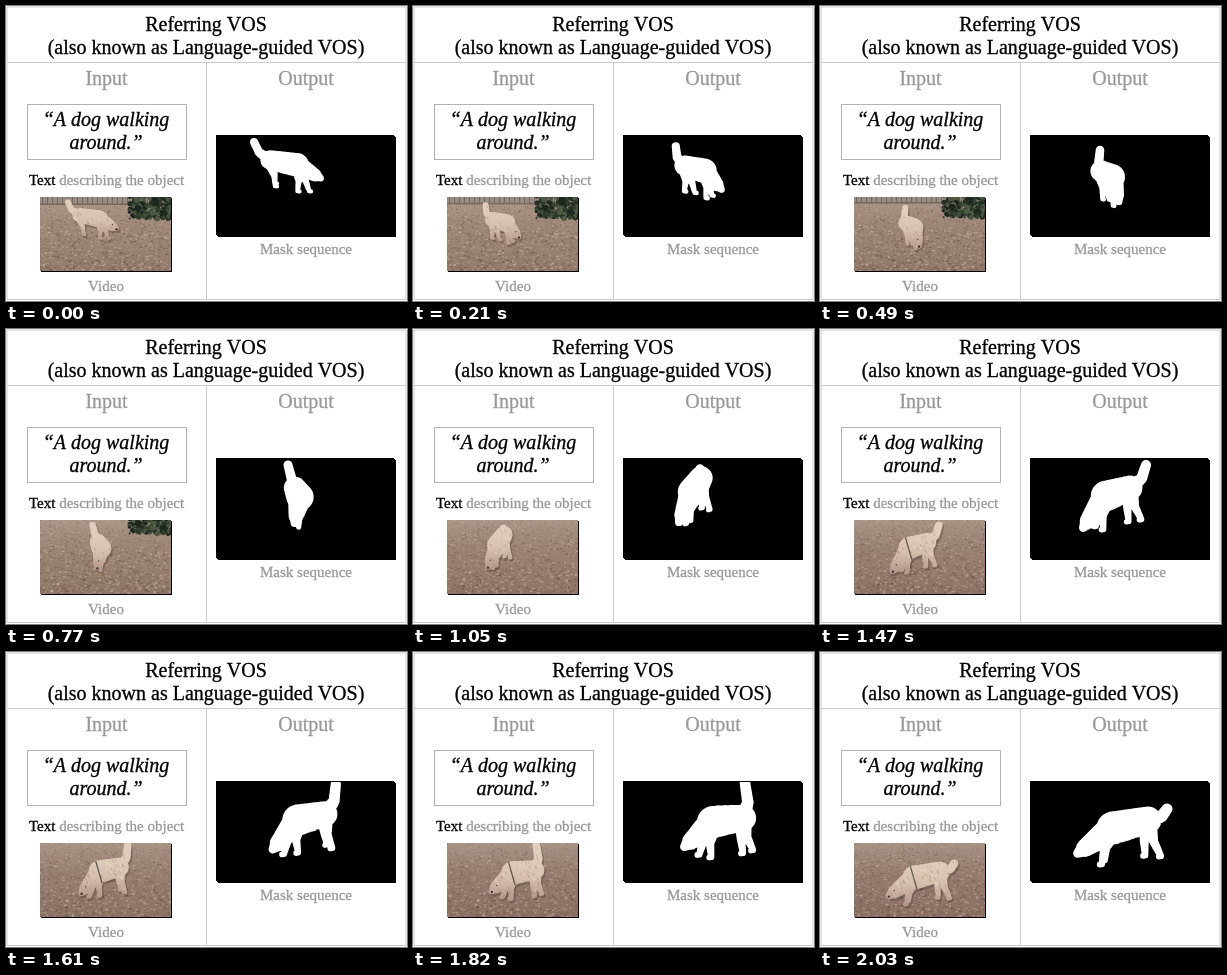
Recreate the animation shown at these times as an HTML page with a canvas. Size 401 by 295 pixels, loop 2100 ms.

```html
<!DOCTYPE html>
<html lang="en">
<head>
<meta charset="utf-8">
<style>
html, body { margin: 0; width: 401px; height: 295px; overflow: hidden; background: #fff; }
canvas { display: block; }
</style>
</head>
<body>
<canvas id="stage" width="401" height="295"></canvas>
<script>
const ctx = document.getElementById('stage').getContext('2d');
const STEP = 70, STEPS = 30;
const photo = { x: 34, y: 191, w: 131, h: 74 };
const mask = { x: 210, y: 129, w: 179, h: 101 };
const zoom = photo.w / mask.w;

// Key joints in mask coordinates: step, tail tip, rump, shoulder, head.
const poses = [
  [0, 248, 136, 264, 154, 291, 159, 309, 169],
  [7, 280, 144, 281, 165, 292, 171, 297, 189],
  [11, 282, 136, 289, 159, 294, 168, 290, 187],
  [15, 287, 140, 288, 149, 279, 163, 269, 186],
  [21, 326, 136, 310, 159, 286, 167, 268, 192],
  [26, 332, 131, 330, 166, 300, 170, 278, 189],
  [29, 347, 157, 328, 168, 293, 176, 265, 196]
];

let seed = 41;
function rnd() {
  seed = (seed * 16807) % 2147483647;
  return seed / 2147483647;
}
const pick = list => list[Math.floor(rnd() * list.length)];
const many = (n, make) => Array.from({ length: n }, make);
const leaves = many(1300, () => ({
  x: rnd() * 140, y: rnd() * 80, w: 0.7 + rnd() * 2, h: 0.6 + rnd(),
  color: pick(['#5d463b', '#77594b', '#c9b19f', '#d8c3b3'])
}));
const bush = many(260, () => ({
  x: 167 - 44 * rnd() ** 1.3, y: 189 + rnd() * 24, r: 0.8 + rnd() * 1.9,
  color: pick(['#252f25', '#34402f', '#1d261e', '#4d5843'])
}));
const tufts = many(220, () => ({ x: rnd() * 120, y: rnd() * 100, light: rnd() < 0.5 }));

const mix = (a, b, k) => a + (b - a) * k;
const clamp = (v, a, b) => Math.min(b, Math.max(a, v));
const ease = k => { k = clamp(k, 0, 1); return k * k * (3 - 2 * k); };

// Smooth curve through the key joints.
function joints(step) {
  const last = poses.length - 1;
  let i = 0;
  while (i < last - 1 && step >= poses[i + 1][0]) i++;
  const a = poses[i], b = poses[i + 1], span = b[0] - a[0];
  const u = (step - a[0]) / span;
  const slope = (j, c) => {
    const p = poses[Math.max(0, j - 1)], q = poses[Math.min(last, j + 1)];
    return (q[c] - p[c]) / (q[0] - p[0]) * span;
  };
  const value = c => mix(a[c], b[c], ease(u)) +
    u * (1 - u) * ((1 - u) * slope(i, c) - u * slope(i + 1, c));
  const point = c => ({ x: value(c), y: value(c + 1) });
  return { tail: point(1), rump: point(3), chest: point(5), head: point(7) };
}

// A tapered limb, built from overlapping circles.
function limb(path, a, ra, b, rb) {
  const n = Math.ceil(Math.hypot(b.x - a.x, b.y - a.y)) + 1;
  for (let i = 0; i <= n; i++) {
    const k = i / n, x = mix(a.x, b.x, k), y = mix(a.y, b.y, k), r = mix(ra, rb, k);
    path.moveTo(x + r, y);
    path.arc(x, y, r, 0, Math.PI * 2);
  }
}

function leg(path, hip, lead, size, turn, phase) {
  const swing = Math.sin(phase) * 8 * size * turn;
  const lift = Math.max(0, Math.cos(phase)) * 4 * size;
  const foot = { x: hip.x + lead + swing, y: hip.y + 36 * size - lift };
  const knee = { x: mix(hip.x, foot.x, 0.6) + 2 * size * turn, y: mix(hip.y, foot.y, 0.6) };
  limb(path, { x: hip.x, y: hip.y + 3 * size }, 9 * size, knee, 4.5 * size);
  limb(path, knee, 4.5 * size, foot, 3.2 * size);
  limb(path, foot, 3.2 * size, { x: foot.x + 2 * turn, y: foot.y + 0.5 }, 3 * size);
}

function makeDog(step) {
  const { tail, rump, chest, head } = joints(step);
  const size = 0.72 + 0.28 * step / 29;
  const turn = clamp((head.x - rump.x) / 30, -1, 1);
  const phase = Math.PI * 2 * step / 9;
  const path = new Path2D();

  const bend = {
    x: mix(rump.x, tail.x, 0.5) - 4 * turn * size,
    y: mix(rump.y, tail.y, 0.5) + 2 * size
  };
  limb(path, rump, 8 * size, bend, 6 * size);
  limb(path, bend, 6 * size, tail, 5.5 * size);
  limb(path, rump, 13.5 * size, chest, 16.5 * size);
  limb(path, chest, 14.5 * size, head, 9 * size);

  const reach = Math.hypot(head.x - chest.x, head.y - chest.y);
  const nose = {
    x: head.x + (head.x - chest.x) / reach * 9 * size,
    y: head.y + (head.y - chest.y) / reach * 9 * size
  };
  limb(path, head, 8.5 * size, nose, 4.5 * size);

  for (const half of [0, Math.PI]) {
    leg(path, rump, 5, size, turn, phase + half);
    leg(path, chest, 0.35 * (head.x - chest.x), size, turn, phase + half + Math.PI / 2);
  }
  return { path, nose, head, chest, size };
}

function rect(x, y, w, h, color) {
  ctx.fillStyle = color;
  ctx.fillRect(x, y, w, h);
}

function disc(x, y, r, color) {
  ctx.fillStyle = color;
  ctx.beginPath();
  ctx.arc(x, y, r, 0, Math.PI * 2);
  ctx.fill();
}

function line(x1, y1, x2, y2, color, width) {
  ctx.strokeStyle = color;
  ctx.lineWidth = width;
  ctx.beginPath();
  ctx.moveTo(x1, y1);
  ctx.lineTo(x2, y2);
  ctx.stroke();
}

function frame(x, y, w, h, color) {
  ctx.strokeStyle = color;
  ctx.lineWidth = 1;
  ctx.strokeRect(x, y, w, h);
}

function fade(y1, y2, ...colors) {
  const g = ctx.createLinearGradient(0, y1, 0, y2);
  colors.forEach((c, i) => g.addColorStop(i / (colors.length - 1), c));
  return g;
}

function text(str, x, y, size, color, align = 'center', style = '') {
  ctx.font = `${style} ${size}px "Liberation Serif", "Times New Roman", serif`;
  ctx.textAlign = align;
  ctx.fillStyle = ctx.strokeStyle = color;
  ctx.lineWidth = 0.3;
  ctx.fillText(str, x, y);
  ctx.strokeText(str, x, y);
  return ctx.measureText(str).width;
}

function drawLabels() {
  const gray = '#999';
  rect(0, 0, 401, 295, '#fff');
  frame(1, 1, 399, 292.5, '#ccc');
  line(1, 56.5, 400, 56.5, '#ccc', 1);
  line(200.5, 56, 200.5, 294, '#ccc', 1);
  frame(21.5, 98.5, 159, 55, '#b3b3b3');
  text('Referring VOS', 200, 25, 20, '#000');
  text('(also known as Language-guided VOS)', 200, 48, 20, '#000');
  text('Input', 100.5, 79, 20, gray);
  text('Output', 300, 79, 20, gray);
  text('“A dog walking', 100, 120, 20, '#000', 'center', 'italic');
  text('around.”', 100, 143, 20, '#000', 'center', 'italic');
  const w = text('Text', 23, 179, 15, '#000', 'left');
  text(' describing the object', 23 + w, 179, 15, gray, 'left');
  text('Video', 100, 285, 15, gray);
  text('Mask sequence', 300, 248, 15, gray);
}

function drawGround(step) {
  const k = step / 29, lift = step * 0.2 + 30 * ease((step - 9) / 7);
  rect(photo.x, photo.y, photo.w, photo.h,
    `rgb(${mix(155, 145, k)}, ${mix(132, 119, k)}, ${mix(116, 106, k)})`);
  rect(photo.x, photo.y, photo.w, photo.h,
    fade(191, 265, 'rgba(190,175,163,.5)', 'rgba(170,145,128,.1)', 'rgba(90,65,52,.15)'));

  ctx.globalAlpha = 0.45;
  for (const f of leaves) {
    const x = (f.x + step * 1.3) % 140, y = (f.y - lift * 0.5 + 160) % 80;
    const depth = 0.6 + y / 120;
    rect(30 + x, 188 + y, f.w * depth, f.h * depth, f.color);
  }
  ctx.globalAlpha = 1;

  const top = 188 - lift;
  rect(34, top, 131, 10, '#988b82');
  for (let x = 36; x < 166; x += 5) rect(x, top, 1, 10, 'rgba(95,85,78,.6)');
  rect(34, top + 9.5, 131, 1.5, 'rgba(110,94,82,.8)');
  for (const b of bush) disc(b.x, b.y - lift, b.r, b.color);
}

function drawVideo(step, dog) {
  rect(photo.x + 1, photo.y + 1, photo.w, photo.h, '#000');
  ctx.save();
  ctx.beginPath();
  ctx.rect(photo.x, photo.y, photo.w, photo.h);
  ctx.clip();
  drawGround(step);

  ctx.translate(photo.x, photo.y);
  ctx.scale(zoom, zoom);
  ctx.translate(-mask.x, -mask.y);
  ctx.save();
  ctx.translate(2, 3);
  ctx.fillStyle = 'rgba(57,42,35,.3)';
  ctx.fill(dog.path);
  ctx.restore();

  const { chest, head, nose, size } = dog;
  ctx.clip(dog.path);
  rect(mask.x, mask.y, mask.w, mask.h,
    fade(chest.y - 22, chest.y + 38 * size, '#e0cdbc', '#d6bfac', '#b3968a'));
  for (const t of tufts) {
    const x = chest.x - 60 + t.x, y = chest.y - 50 + t.y;
    line(x, y, x + 2, y + 4, t.light ? 'rgba(240,225,212,.4)' : 'rgba(140,112,95,.35)', 1.3);
  }
  const strap = ease((step - 15) / 5);
  line(chest.x - 6, chest.y - 15, chest.x + 3, chest.y + 16, `rgba(55,48,48,${0.75 * strap})`, 1.7);
  disc(nose.x, nose.y + 1, 1.6, '#3c302c');
  disc(head.x, head.y - 2, 1, '#54433b');
  ctx.restore();
}

function drawMask(dog) {
  for (let i = 0; i < 3; i++) rect(mask.x + i, mask.y + i, mask.w - 1, mask.h - 1, '#000');
  ctx.save();
  ctx.beginPath();
  ctx.rect(mask.x, mask.y + 1, mask.w, mask.h - 1);
  ctx.clip();
  ctx.fillStyle = '#fff';
  ctx.fill(dog.path);
  ctx.restore();
}

function draw(now) {
  const step = Math.floor(now / STEP) % STEPS;
  const dog = makeDog(step);
  drawLabels();
  drawVideo(step, dog);
  drawMask(dog);
}

let start;
function tick(now) {
  if (start === undefined) start = now;
  draw(Math.max(0, now - start));
  requestAnimationFrame(tick);
}
draw(0);
requestAnimationFrame(tick);
</script>
</body>
</html>
```
